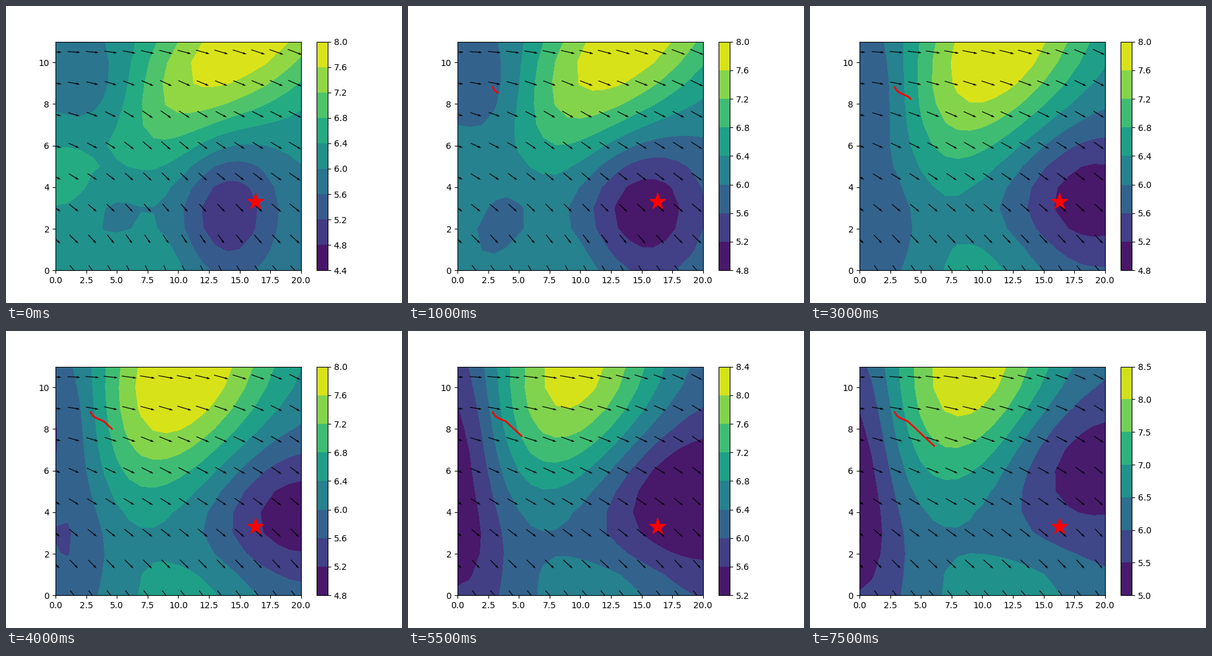
Animation, 640 px wide and 480 px high, one loop 8 s. Source, as a matplotlib script:

```python
import numpy as np
import matplotlib.pyplot as plt
from matplotlib.animation import FuncAnimation

FRAMES, STEP = 16, 500  # frame count, ms per frame
SPAN = (FRAMES - 1) * STEP / 1000

X, Y = np.meshgrid(np.arange(21.0), np.arange(12.0))
QX, QY = np.meshgrid(np.arange(0, 20, 1.5), np.arange(0, 11, 1.5))

# Colour scale: start time, lowest level, highest level, step
SCALES = [(0, 4.4, 8.0, 0.4), (0.5, 4.8, 8.0, 0.4), (4.5, 4.8, 8.4, 0.4),
          (5.5, 5.2, 8.4, 0.4), (7.5, 5.0, 8.5, 0.5)]

# Corners of the track: time, x, y
TRACK = np.array([(0, 2.87, 8.81), (0.5, 3.03, 8.65), (1, 3.27, 8.54),
                  (2.5, 3.95, 8.36), (7.5, 6.08, 7.19)]).T


def mix(a, b, k):
    return a + (b - a) * k


def bump(height, cx, cy, sx, sy, tilt=0):
    """Gaussian hill whose axis leans by tilt (x per y)."""
    dy = Y - cy
    dx = X - cx - tilt * dy
    return height * np.exp(-((dx / sx) ** 2 + (dy / sy) ** 2) / 2)


def field(t):
    s = t / SPAN
    w = 1 - (1 - s) ** 2  # drift slows down
    g = s ** 1.5          # growth speeds up
    warm_plume = bump(mix(1.88, 2.45, g), mix(15.5, 9, w), mix(11, 10.8, w),
                      mix(5.6, 5.2, w), mix(4, 4.3, w), mix(1.4, 0.2, w))
    warm_south = bump(mix(0.42, 0.82, g), mix(7.3, 12, w), 0, mix(3, 4.5, w), 1.5)
    warm_west = bump(mix(0.35, 0, w), 0.5, 4.6, 2, 1.3)
    cold_eddy = bump(mix(-1.25, -1, s), mix(14, 18, s) + 3.5 * np.sin(np.pi * s) ** 2,
                     mix(2.9, 6.4, s ** 2), mix(3, 5.5, w), 2.45)
    cold_north = bump(mix(-0.65, -0.95, g), mix(3.5, 0, w), 8.5,
                      mix(3, 2.5, w), mix(2, 3, w))
    cold_south = bump(mix(-0.4, -0.85, g), mix(5, 0, w), mix(2.8, 3, w),
                      mix(2.2, 2.5, w), mix(1.6, 3, w))
    return (mix(6.06, 6, w) + warm_plume + warm_south + warm_west
            + cold_eddy + cold_north + cold_south)


def flow(t):
    """Arrow components in pixels (right, down)."""
    w = 1 - (1 - t / SPAN) ** 2
    east, depth = QX / 20, 1 - QY / 10.5
    mid = np.sin(np.pi * east)
    u0 = mix(20 + 3 * east, 15 - 8 * mid, depth)
    u1 = mix(19 + 8 * mid - 3 * east, 11 + 3 * mid, depth)
    swirl = 5 * np.exp(-((QX - 8) / 4) ** 2 - ((QY - 7) / 3) ** 2)
    v = mix(0.5 + 8.5 * east, 16 - east, depth) + swirl * (1 - w)
    return mix(u0, u1, w), v


def levels_at(t):
    _, lo, hi, step = [row for row in SCALES if row[0] <= t][-1]
    return np.linspace(lo, hi, round((hi - lo) / step) + 1).round(1)


fig = plt.figure(figsize=(6.4, 4.8), dpi=100)


def draw(i):
    t = i * STEP / 1000
    fig.clf()
    ax = fig.add_subplot()

    levels = levels_at(t)
    z = np.clip(field(t), levels[0] + 0.01, levels[-1] - 0.01)
    fig.colorbar(ax.contourf(X, Y, z, levels=levels), ax=ax)

    u, v = flow(t)
    ax.quiver(QX, QY, u, -v, pivot="mid", scale=1, scale_units="dots", width=0.003)

    past = np.arange(i + 1) * STEP / 1000
    ax.plot(np.interp(past, TRACK[0], TRACK[1]),
            np.interp(past, TRACK[0], TRACK[2]), color="red", lw=2)
    ax.plot(16.3, 3.3, "*", color="red", ms=20)
    ax.set(xlim=(0, 20), ylim=(0, 11))
    return []


anim = FuncAnimation(fig, draw, frames=FRAMES, interval=STEP,
                     init_func=lambda: [], repeat=True, repeat_delay=0)
plt.show()
```
